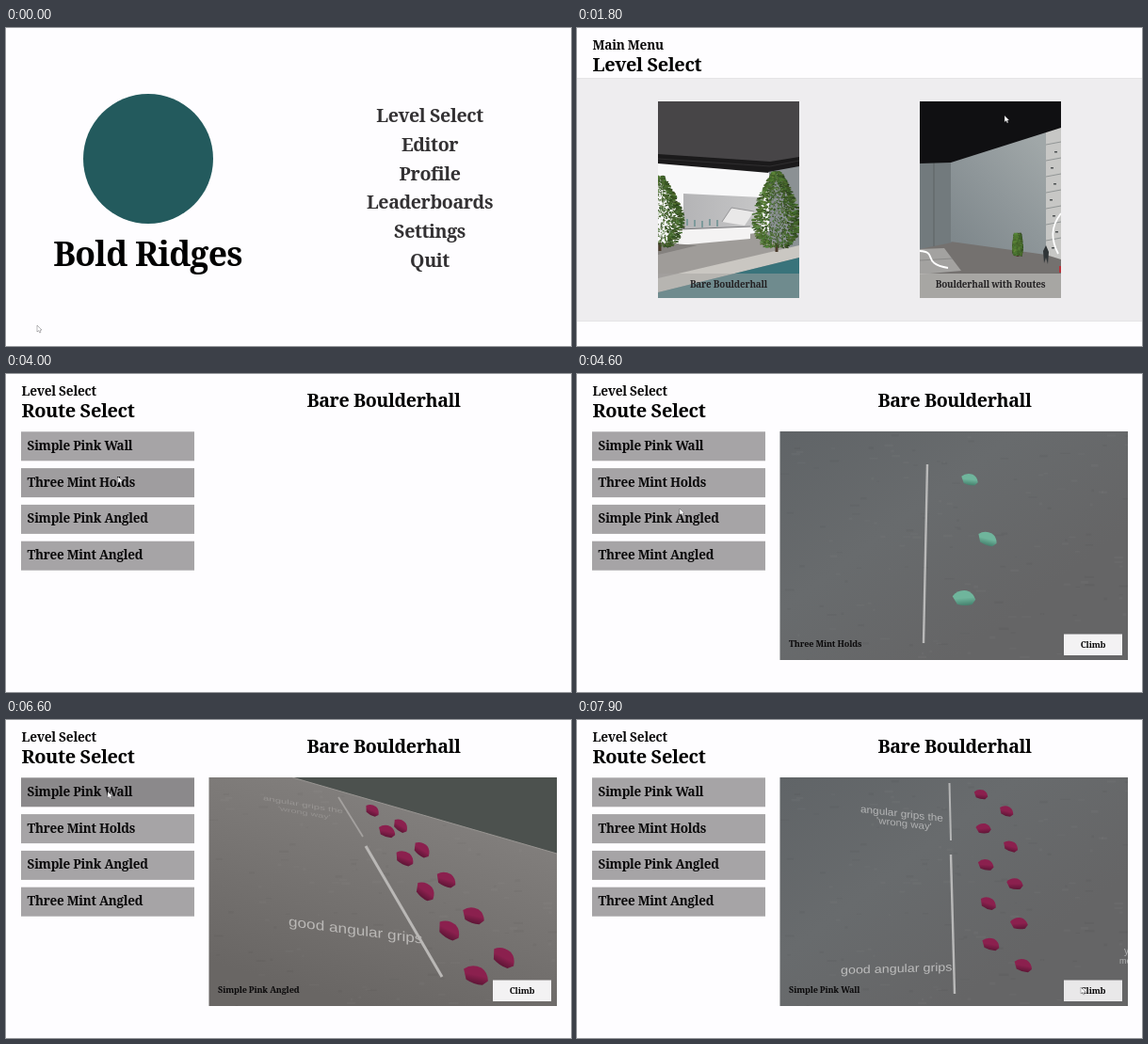
An HTML page with a canvas for the animation above (8 s loop, 600 by 338 pixels).

```html
<!DOCTYPE html>
<html lang="en">
<head>
<meta charset="utf-8">
<title>Climbing menu</title>
<style>
html, body { margin: 0; width: 100%; height: 100%; overflow: hidden; background: #fefdff; }
canvas { display: block; width: 600px; height: 338px; }
</style>
</head>
<body>
<canvas id="stage" width="600" height="338"></canvas>
<script>
const ctx = document.getElementById('stage').getContext('2d');
const LOOP = 8000, STEP = 100;
const SLAB = '"Noto Serif", serif', SANS = '"Liberation Sans", Arial, sans-serif';
const PINK = ['#8b204e', '#5c1535'], MINT = ['#6fb59c', '#447f6c'];

const MENU = ['Level Select', 'Editor', 'Profile', 'Leaderboards', 'Settings', 'Quit'];
const ROUTES = [
  { name: 'Simple Pink Wall', press: 6500, release: 6700, show: 6700, scene: pinkWall },
  { name: 'Three Mint Holds', press: 4000, release: 4200, show: 4200, scene: mintWall },
  { name: 'Simple Pink Angled', press: 5100, release: 5400, show: 5300, scene: pinkAngled },
  { name: 'Three Mint Angled' }
];

// Pointer moves: start, end, goal x, goal y
const MOVES = [
  [400, 1000, 527, 235], [1000, 1300, 490, 137], [1300, 1600, 454, 93],
  [1800, 2700, 182, 181], [3100, 3300, 212, 152], [3400, 4000, 119, 109],
  [4300, 4600, 109, 143], [4700, 4900, 110, 155], [5700, 6150, 572, 275],
  [6150, 6500, 108, 76], [6900, 7800, 535, 284]
];

function pointer(t) {
  const p = { x: 33, y: 316 };
  for (const [from, to, x, y] of MOVES) {
    const u = Math.max(0, Math.min(1, (t - from) / (to - from))), e = u * u * (3 - 2 * u);
    p.x += (x - p.x) * e;
    p.y += (y - p.y) * e;
  }
  return p;
}

function rng(seed) {
  return () => (seed = (seed * 16807) % 2147483647) / 2147483647;
}

function rect(x, y, w, h, fill) {
  ctx.fillStyle = fill;
  ctx.fillRect(x, y, w, h);
}

function trace(p) {
  ctx.beginPath();
  for (let i = 0; i < p.length; i += 2) ctx.lineTo(p[i], p[i + 1]);
}

function poly(fill, ...p) {
  trace(p);
  ctx.fillStyle = fill;
  ctx.fill();
}

function line(color, width, ...p) {
  trace(p);
  ctx.strokeStyle = color;
  ctx.lineWidth = width;
  ctx.stroke();
}

function gradient(x0, y0, x1, y1, ...colors) {
  const g = ctx.createLinearGradient(x0, y0, x1, y1);
  colors.forEach((c, i) => g.addColorStop(i / (colors.length - 1), c));
  return g;
}

function label(str, x, y, size, align = 'left', color = '#0b0a0b') {
  ctx.font = `700 ${size}px ${SLAB}`;
  ctx.letterSpacing = -0.02 * size + 'px';
  ctx.textAlign = align;
  ctx.fillStyle = color;
  ctx.fillText(str, x, y);
  ctx.letterSpacing = '0px';
}

// Lettering painted on a wall, seen at an angle
function paint(str, x, y, size, slope, squash, color) {
  ctx.save();
  ctx.transform(1, slope, 0, squash, x, y);
  ctx.font = `${size}px ${SANS}`;
  ctx.textAlign = 'left';
  ctx.fillStyle = color;
  ctx.fillText(str, 0, 0);
  ctx.restore();
}

function clipped(x, y, w, h, draw) {
  ctx.save();
  ctx.beginPath();
  ctx.rect(x, y, w, h);
  ctx.clip();
  draw();
  ctx.restore();
}

function cursor({ x, y }) {
  ctx.save();
  ctx.translate(x, y);
  const arrow = [0, 0, 0, 7, 1.7, 5.6, 2.8, 8, 4, 7.4, 3, 5.2, 5, 5, 0, 0];
  poly('#fff', ...arrow);
  line('rgba(60,58,62,.6)', 0.6, ...arrow);
  ctx.restore();
}

function mainMenu(p) {
  ctx.beginPath();
  ctx.arc(151, 139, 69, 0, 7);
  ctx.fillStyle = '#235a5d';
  ctx.fill();
  label('Bold Ridges', 150.5, 253, 35.5, 'center', '#000');
  MENU.forEach((name, i) => {
    const mid = 93 + i * 30.8;
    const over = Math.abs(p.y - mid) < 15.4 && Math.abs(p.x - 450) < 72;
    ctx.save();
    ctx.translate(450, mid);
    if (over) ctx.scale(1.25, 1.25);
    label(name, 0, 7, 19.6, 'center', '#333133');
    ctx.restore();
  });
}

function heading(small, big) {
  label(small, 16.5, 23.2, 13.7);
  label(big, 16.5, 45.7, 20, 'left', '#000');
}

function tree(x, top, w, h, seed) {
  const rand = rng(seed);
  rect(x - 1.5, top + h - 8, 3, 9, '#4a3a2b');
  for (let i = 0; i < 1500; i++) {
    const v = 0.02 + rand() * 0.93, side = rand() * 2 - 1;
    const half = w / 2 * Math.sin(Math.PI * v ** 1.5) ** 0.6;
    const px = x + side * half, py = top + v * h;
    const light = 14 + i / 1500 * 12 + rand() * 12 - side * 3;
    line(`hsl(${86 + rand() * 16},40%,${light}%)`, 1.3, px, py, px + side * 4, py + rand() * 2 - 0.5);
  }
}

function bareHall() {
  rect(86, 78, 150, 209, '#9f9c99');
  rect(86, 78, 150, 70, '#474547');
  poly('#1b1a1b', 86, 134, 205, 142, 236, 137, 236, 160, 86, 160);
  line('#383738', 0.7, 86, 139, 205, 147, 236, 141);
  poly('#8b9194', 203, 153, 236, 147, 236, 236, 203, 226);
  poly('#f8f8f9', 86, 144, 204, 154, 204, 216, 86, 232);
  poly(gradient(113, 0, 196, 0, '#b4b4b6', '#c6c6c7'), 113, 176, 196, 180, 196, 212, 113, 214);
  poly('#e9e8e8', 154, 206, 164, 191, 188, 195, 178, 210);
  line('#7c7c7e', 0.7, 154, 206, 164, 191, 188, 195);
  poly('#f4f3f3', 108, 214, 184, 211, 184, 224, 108, 231);
  line('#77777a', 1, 108, 214, 184, 211);
  for (let x = 116; x < 150; x += 8) rect(x, 205 - x % 3, 2, 7, '#7d9a9b');
  poly('#85827f', 86, 228, 128, 231, 86, 241);
  poly('#cac7c2', 86, 266, 236, 231, 236, 244, 86, 281);
  poly('#39737b', 86, 281, 236, 244, 236, 287, 86, 287);
  tree(212, 151, 46, 86, 41);
  tree(88, 156, 46, 80, 77);
}

function routeHall() {
  rect(364, 78, 150, 209, '#74716f');
  poly('#727a7d', 364, 138, 398, 138, 398, 228, 364, 235);
  line('#5c6365', 1, 379, 142, 379, 232);
  poly(gradient(398, 220, 498, 130, '#7f888c', '#8f979a', '#a0a7a8'), 397, 138, 498, 105, 498, 241, 397, 227);
  poly('#c7c7c5', 498, 105, 514, 100, 514, 246, 498, 241);
  for (let y = 124; y < 240; y += 17) {
    line('#85898a', 0.8, 498, y, 514, y - 3);
    rect(502 + y % 7, y + 7, 3, 1.5, '#4d5152');
  }
  poly('#101012', 364, 78, 514, 78, 514, 106, 397, 143, 364, 144);
  poly('#a3a2a0', 364, 235, 390, 234, 408, 258, 364, 262);
  line('#7f7e7d', 0.7, 364, 247, 399, 245);
  ctx.beginPath();
  ctx.moveTo(364, 237);
  ctx.bezierCurveTo(384, 238, 365, 250, 394, 255);
  ctx.moveTo(514, 197);
  ctx.bezierCurveTo(502, 212, 504, 226, 511, 240);
  ctx.strokeStyle = '#fff';
  ctx.lineWidth = 1.8;
  ctx.stroke();
  tree(468, 218, 4, 24, 5);
  poly('#303537', 498, 231, 501, 238, 500, 251, 498, 244, 496, 250, 495, 237);
  rect(512, 253, 2, 7, '#b9323a');
}

function card(x, name, scene, veil) {
  clipped(x, 78, 150, 209, scene);
  rect(x, 261, 150, 26, veil);
  label(name, x + 75, 276, 9.9, 'center', '#242224');
}

function levelSelect() {
  heading('Main Menu', 'Level Select');
  rect(0, 53, 600, 259, '#e5e4e6');
  rect(0, 54, 600, 257, '#eeedef');
  card(86, 'Bare Boulderhall', bareHall, 'rgba(165,164,162,.5)');
  card(364, 'Boulderhall with Routes', routeHall, 'rgba(190,188,185,.7)');
}

function hold(x, y, r, turn, [face, shade]) {
  ctx.save();
  ctx.translate(x, y);
  ctx.rotate(turn);
  ctx.scale(r, r);
  ctx.beginPath();
  ctx.moveTo(-1, -0.25);
  ctx.quadraticCurveTo(-0.5, -0.8, 0.3, -0.62);
  ctx.quadraticCurveTo(0.85, -0.4, 1, 0.25);
  ctx.lineTo(0.65, 0.65);
  ctx.quadraticCurveTo(0, 0.75, -0.65, 0.5);
  ctx.closePath();
  ctx.fillStyle = gradient(0, -0.7, 0, 0.7, face, face, shade);
  ctx.fill();
  ctx.restore();
}

// A zigzag of holds climbing the wall; at(i, odd) gives each place
function holds(count, size, growth, turn, colors, at) {
  for (let i = 0; i < count; i++) {
    const [x, y] = at(i, i % 2);
    hold(x, y, size + growth * i, turn + Math.sin(i * 2.4) * 0.2, colors);
  }
}

function grain() {
  const rand = rng(9);
  for (let i = 0; i < 160; i++) {
    const x = 216 + rand() * 369, y = 61 + rand() * 243;
    rect(x, y, 2 + rand() * 9, 1 + rand() * 2, i % 2 ? 'rgba(255,255,255,.025)' : 'rgba(0,0,0,.035)');
  }
}

function straightWall() {
  rect(215, 61, 370, 243, gradient(216, 61, 400, 304, '#606467', '#686b6d', '#656566'));
  grain();
}

function pinkWall() {
  straightWall();
  line('#b4b5b5', 2, 395.5, 67, 397, 128);
  line('#b9b9b9', 2.4, 397, 143, 401, 291);
  paint('angular grips the', 301, 98, 11.8, 0.115, 0.9, '#b5b6b7');
  paint("'wrong way'", 318, 110, 11.4, 0.115, 0.9, '#b0b1b2');
  paint('good angular grips', 280, 270, 14.3, -0.03, 0.85, '#bcbcbc');
  paint('y', 581, 249, 10, 0, 1, '#b0b1b2');
  paint('me', 576, 259, 9, 0, 1, '#b0b1b2');
  holds(10, 7.5, 0.25, 0.1, PINK, (i, odd) =>
    [429 + 1.3 * i + odd * (25 + 0.9 * i), 79 + 17.5 * i + 0.3 * i * i]);
}

function mintWall() {
  straightWall();
  line('#b9b9b9', 2.4, 372, 96, 368, 286);
  holds(3, 9, 1.5, 0.1, MINT, (i, odd) => [417 - 3 * i + 22 * odd, 112 + 63 * i]);
}

function pinkAngled() {
  rect(215, 61, 370, 243, gradient(450, 61, 380, 304, '#858280', '#777472', '#696664'));
  grain();
  poly('#4c514e', 304, 61, 585, 61, 585, 142);
  line('#989592', 1, 304, 61, 585, 142);
  line('#a4a19f', 1.8, 353, 82, 379, 124);
  line('#bab8b6', 3, 382, 134, 463, 273);
  paint('angular grips the', 273, 85, 11.4, 0.17, 0.6, '#989593');
  paint("'wrong way'", 289, 96, 10.8, 0.17, 0.6, '#959290');
  paint('good angular grips', 300, 219, 17.2, 0.13, 0.85, '#bab8b6');
  holds(11, 8, 0.6, 0.4, PINK, (i, odd) =>
    [389 + 7 * i + 0.4 * i * i + odd * (20 + 2.7 * i), 96 + 9.5 * i + 0.8 * i * i + 6 * odd]);
}

function pressAmount({ press, release }, t) {
  if (!(t >= press && t < release)) return 0;
  return t < press + STEP ? 0.25 : 1;
}

function routeSelect(t, p) {
  heading('Level Select', 'Route Select');
  label('Bare Boulderhall', 401, 35, 19.6, 'center', '#000');
  ROUTES.forEach((route, i) => {
    const y = 61.3 + i * 38.8, v = 166 - 27 * pressAmount(route, t);
    rect(16, y, 184, 31, `rgb(${v},${v - 2},${v})`);
    label(route.name, 22.5, y + 19.4, 13.5);
  });

  const shown = ROUTES.filter(r => r.show <= t).sort((a, b) => b.show - a.show)[0];
  if (!shown) return;
  clipped(215.5, 61, 369.5, 243, shown.scene);
  label(shown.name, 225, 290, 9.1);
  const over = p.x > 517 && p.x < 579 && p.y > 277 && p.y < 299;
  rect(517, 276.5, 62, 22.5, over ? '#e9e8e9' : '#f3f2f3');
  label('Climb', 548, 291.3, 9.2, 'center');
}

let drawn = -1;
function draw(now) {
  const t = Math.floor((now % LOOP) / STEP) * STEP, p = pointer(t);
  if (t === drawn) return;
  drawn = t;
  rect(0, 0, 600, 338, '#fefdff');
  if (t < 1800) mainMenu(p);
  else if (t < 2800) levelSelect();
  else routeSelect(t, p);
  cursor(p);
}

const begin = performance.now();
function tick() {
  draw(performance.now() - begin);
  requestAnimationFrame(tick);
}
tick();
</script>
</body>
</html>
```
